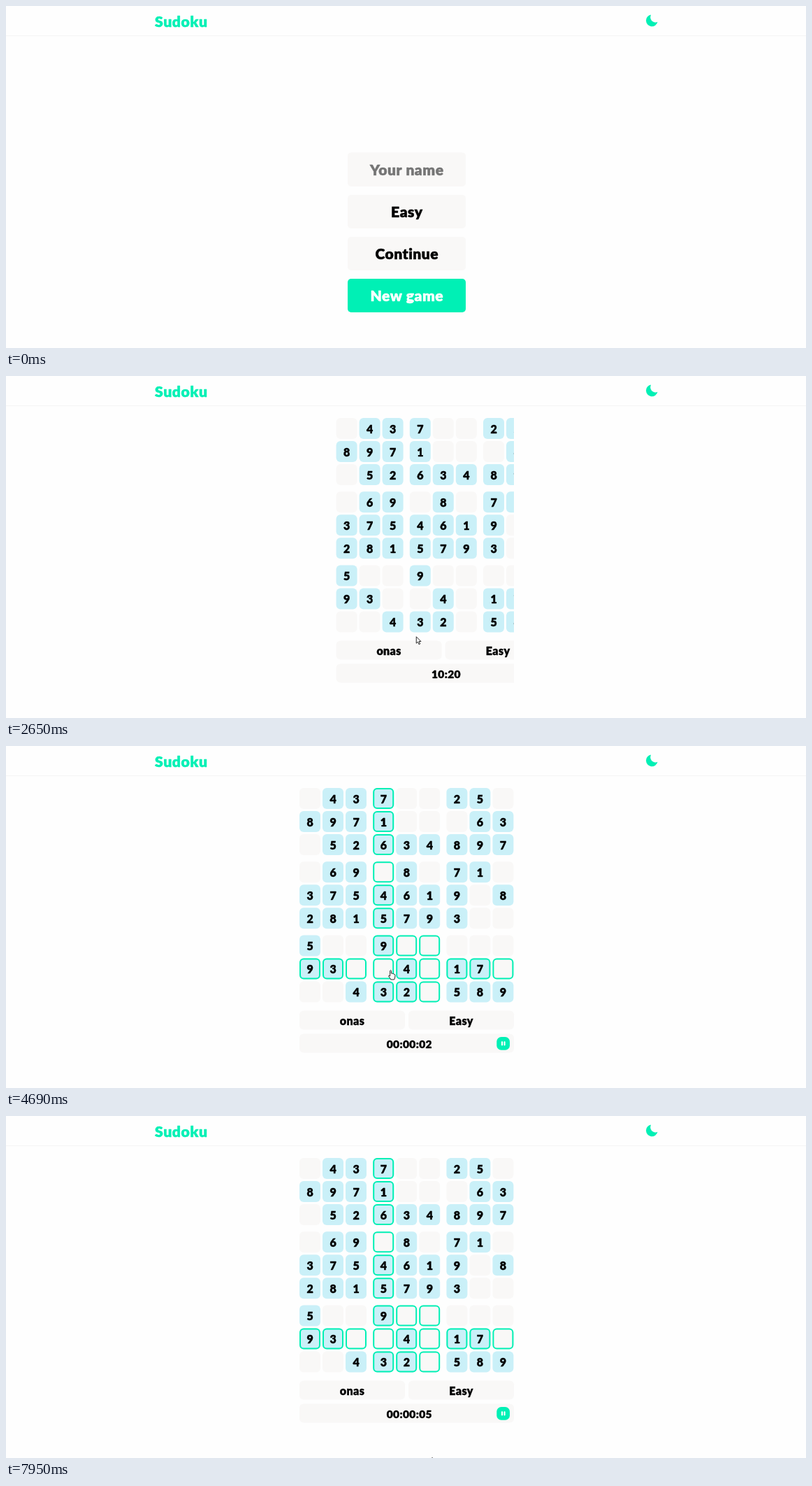
Animation of 1145x489 px, one loop 7990 ms. Source, as an HTML page with a canvas:

```html
<!DOCTYPE html>
<html lang="en">
<head>
<meta charset="utf-8">
<title>Sudoku</title>
<style>
html, body { margin: 0; width: 100%; height: 100%; overflow: hidden; background: #fefefe; }
canvas { display: block; }
</style>
</head>
<body>
<canvas id="stage" width="1145" height="489"></canvas>
<script>
const ctx = document.getElementById('stage').getContext('2d');
const LOOP = 7990;
const MINT = '#00f0b5', PAPER = '#f9f8f7', SKY = '#caf0f8', RED = '#ee1f60', INK = '#000', BG = '#fefefe';
const FACE = 'Lato, "Open Sans", sans-serif';
const PLAYER = 'onas';
const FOCUS = 700, TYPE = 950, KEY_GAP = 138, BLINK = 530;
const SLIDE = 2330, SLIDE_TIME = 722, TIMER_START = 2500;
const PICK = 4380, ENTER = 5590, SHAKE = 5620, SHAKE_TIME = 500, ERASE = 7650;
const PICK_ROW = 7, PICK_COL = 3;
const PUZZLE = `
  .437..25. 8971...63 .52634897
  .69.8.71. 3754619.8 2815793..
  5..9..... 93..4.17. ..432.589`.trim().split(/\s+/);

// Pointer visits: waypoints of time, x and y. Each leg slows towards its end.
const VISITS = [
  [[70, 1070, 476], [840, 590, 235], [TYPE, 590, 235]],
  [[1400, 597, 255], [1900, 634, 415], [2310, 634, 415], [2650, 587, 373],
   [3090, 645, 232], [3540, 725, 462], [3680, 722, 491]],
  [[3990, 604, 428], [4340, 542, 316], [4690, 550, 319], [5050, 556, 491]],
  [[5930, 510, 489], [6200, 706, 285], [6590, 660, 464]],
  [[7940, 610, 488], [LOOP, 610, 488]]
];

const clamp = v => Math.max(0, Math.min(1, v));
const span = (t, start, time) => clamp((t - start) / time);
const slot = i => 33 * i + 6.2 * Math.floor(i / 3);
const inside = (v, from, to) => v >= from && v < to;

function box(x, y, w, h, r, fill) {
  ctx.fillStyle = fill;
  ctx.beginPath();
  ctx.roundRect(x, y, w, h, r);
  ctx.fill();
}

function outline(x, y, w, h, r, line) {
  ctx.strokeStyle = MINT;
  ctx.lineWidth = line;
  ctx.beginPath();
  ctx.roundRect(x + line / 2, y + line / 2, w - line, h - line, r - line / 2);
  ctx.stroke();
}

// The thin round stroke softens and thickens the letters.
function label(str, x, y, size, color = INK, align = 'center') {
  ctx.font = `900 ${size}px ${FACE}`;
  ctx.letterSpacing = size / 40 + 'px';
  ctx.textAlign = align;
  ctx.lineJoin = 'round';
  ctx.lineWidth = size / 40;
  ctx.fillStyle = ctx.strokeStyle = color;
  ctx.fillText(str, x, y);
  ctx.strokeText(str, x, y);
}

function drawHeader() {
  label('Sudoku', 213, 29.5, 21.3, MINT, 'left');
  ctx.fillStyle = '#f4f4f4';
  ctx.fillRect(0, 42, 1145, 1);
  ctx.fillStyle = MINT;
  ctx.fill(new Path2D('M923 12.5A8.4 8.4 0 1 0 932.6 22.8Q929.5 24.3 926.2 22.6Q920.6 19.4 923 12.5Z'));
}

function drawInput(t) {
  box(489, 209.5, 169, 48.5, 5, PAPER);
  const count = Math.min(PLAYER.length, Math.max(0, Math.floor((t - TYPE) / KEY_GAP) + 1));
  const typed = PLAYER.slice(0, count);
  label(typed || 'Your name', 573.8, 242.3, 21, typed ? INK : '#757575');
  if (t < FOCUS) return;
  outline(489, 209.5, 169, 48.5, 5, 1.5);
  const lastKey = count ? TYPE + KEY_GAP * (count - 1) : FOCUS;
  if (Math.floor((t - lastKey) / BLINK) % 2) return;
  const width = typed ? ctx.measureText(typed).width : 0;
  ctx.fillStyle = '#222';
  ctx.fillRect(Math.round(573.5 + width / 2), 221, 1, 26);
}

function drawMenu(t) {
  drawInput(t);
  ['Easy', 'Continue', 'New game'].forEach((name, i) => {
    const y = 270 + 60 * i, main = i === 2;
    box(489, y, 169, 48, 5, main ? MINT : PAPER);
    label(name, 573.8, y + 32.3, 21, main ? '#fff' : INK);
  });
}

function drawCell(row, col, t) {
  const picked = row === PICK_ROW && col === PICK_COL;
  const entered = inside(t, ENTER, ERASE);
  const clash = entered && row === 8 && col === 4;
  const sameBox = row >= 6 && inside(col, 3, 6);
  const lit = row === PICK_ROW || col === PICK_COL || sameBox;
  const given = PUZZLE[row][col] !== '.';
  const digit = picked && entered ? '2' : PUZZLE[row][col];
  const p = span(t, SHAKE, SHAKE_TIME), swell = Math.sin(Math.PI * p);
  const size = picked ? 1 - 0.2 * swell : clash ? 1 + 0.12 * swell : 1;

  ctx.save();
  ctx.translate(435 + slot(col), 75 + slot(row));
  ctx.scale(size, size);
  if (clash) ctx.rotate(-0.09 * Math.sin(5 * Math.PI * p));
  box(-15, -15, 30, 30, 6, clash ? RED : given ? SKY : PAPER);
  if (lit && t > PICK) {
    ctx.globalAlpha = span(t, PICK, 150);
    outline(-15, -15, 30, 30, 6, 2);
    ctx.globalAlpha = 1;
  }
  if (digit !== '.') label(digit, 0.3, 7, 16, clash ? '#fff' : INK);
  ctx.restore();
}

function drawPause() {
  box(702.3, 416, 18.7, 18.7, 6.5, MINT);
  for (const x of [709, 712.5]) box(x, 422.2, 2.1, 6.2, 0.8, '#fff');
}

function drawGame(t) {
  for (let row = 0; row < 9; row++)
    for (let col = 0; col < 9; col++) drawCell(row, col, t);

  box(420, 378.5, 151, 27, 6, PAPER);
  box(576, 378.5, 151, 27, 6, PAPER);
  box(420, 411.5, 307, 27, 6, PAPER);
  label(PLAYER, 495.5, 398.5, 16);
  label('Easy', 651.5, 398.5, 16);

  const seconds = Math.floor((t - TIMER_START) / 1000);
  label(t < SLIDE + SLIDE_TIME ? '10:20' : '00:00:0' + seconds, 577.3, 431.7, 15.5);
  drawPause();
}

function drawScene(t) {
  const p = span(t, SLIDE, SLIDE_TIME);
  const shift = 307 * (1 - p) ** 3;
  ctx.save();
  if (p > 0 && p < 1) {
    ctx.beginPath();
    ctx.rect(420, 43, 307, 446);
    ctx.clip();
  }
  if (p < 1) {
    ctx.save();
    ctx.translate(shift - 307, 0);
    drawMenu(t);
    ctx.restore();
  }
  if (p > 0) {
    ctx.translate(shift, 0);
    drawGame(t);
  }
  ctx.restore();
}

const ARROW = new Path2D('M0 .4V9.8L2.2 7.8L3.8 11.4L5.4 10.7L3.8 7.2H6.7Z');
const HAND = new Path2D('M2.6 9V1.4Q3.5 0 4.4 1.4V5.2Q6 4.5 6.4 5.7Q7.8 5.2 8.2 6.4Q9.8 6.2 9.8 7.6V10Q9.6 12 8.6 14H3.8Q2.4 11.6 .5 9.2Q.6 7.4 2.6 9Z');
const BEAM = new Path2D('M-2.5 -6.5H2.5M0 -6.5V6.5M-2.5 6.5H2.5');

function pointerAt(t) {
  const visit = VISITS.find(v => inside(t, v[0][0], v[v.length - 1][0]));
  if (!visit) return null;
  const i = visit.findIndex(point => point[0] > t);
  const [t0, x0, y0] = visit[i - 1], [t1, x1, y1] = visit[i];
  const p = 1 - (1 - span(t, t0, t1 - t0)) ** 2;
  return [x0 + (x1 - x0) * p, y0 + (y1 - y0) * p];
}

function pointerShape(t, x, y) {
  if (t >= SLIDE) return inside(x, 420, 727) && inside(y, 60, 367) ? HAND : ARROW;
  if (!inside(x, 489, 658) || !inside(y, 209, 438)) return ARROW;
  if (y < 258) return BEAM;
  return inside((y - 270) % 60, 0, 48) ? HAND : ARROW;
}

function drawPointer(t) {
  const spot = pointerAt(t);
  if (!spot) return;
  const [x, y] = spot, shape = pointerShape(t, x, y);
  ctx.save();
  ctx.translate(x - (shape === HAND ? 3 : 0), y);
  ctx.lineWidth = 0.9;
  ctx.lineJoin = 'round';
  ctx.strokeStyle = '#111';
  ctx.fillStyle = '#fff';
  if (shape !== BEAM) ctx.fill(shape);
  ctx.stroke(shape);
  ctx.restore();
}

function frame(now) {
  const t = now % LOOP;
  ctx.fillStyle = BG;
  ctx.fillRect(0, 0, 1145, 489);
  drawHeader();
  drawScene(t);
  drawPointer(t);
  requestAnimationFrame(frame);
}
requestAnimationFrame(frame);
</script>
</body>
</html>
```
